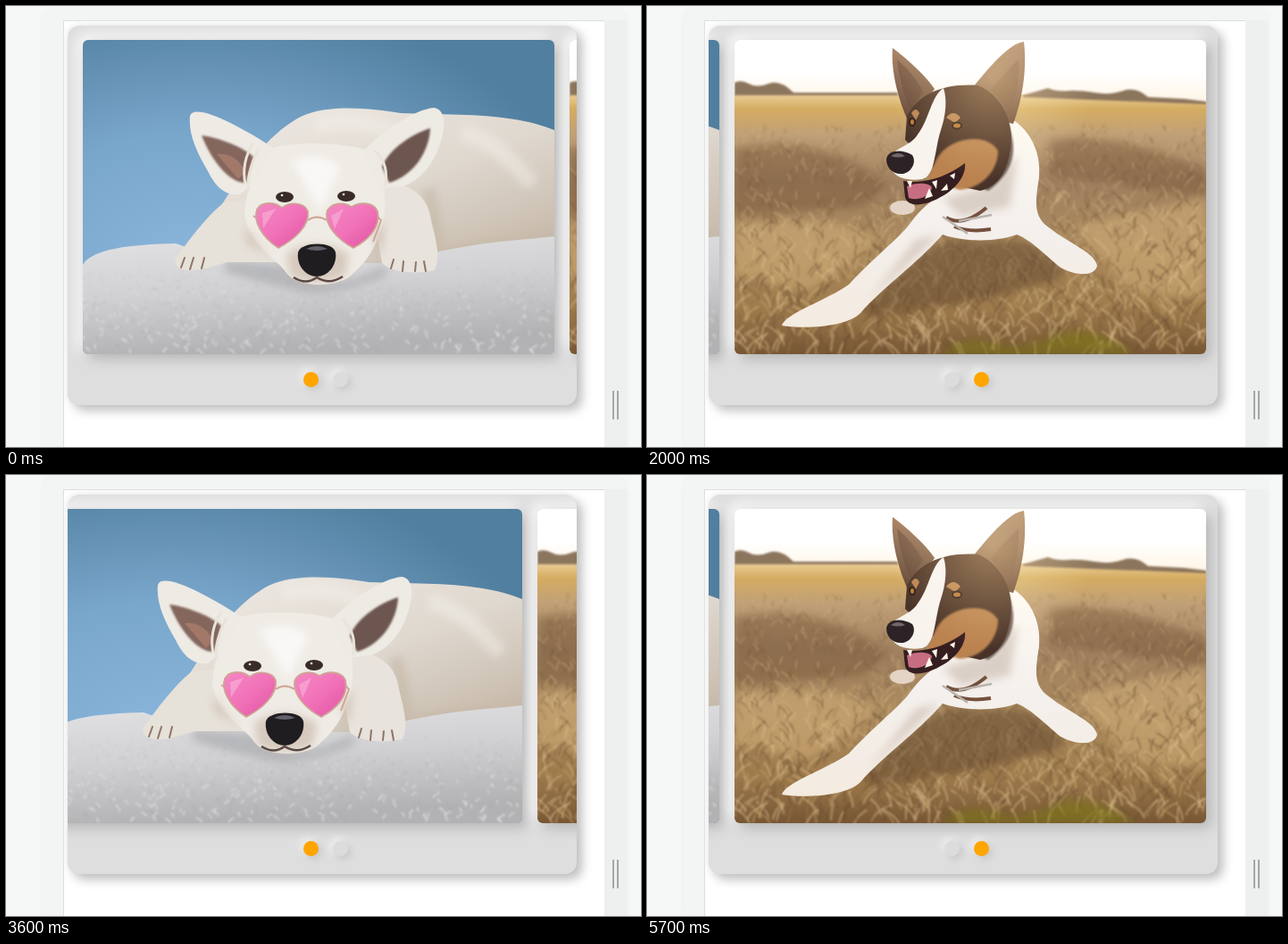
Animation of 711 by 494 pixels, one loop 5.8 s. Source, as an HTML page:

```html
<!DOCTYPE html>
<html lang="en">
<head>
<meta charset="utf-8">
<title>Photo slider</title>
<style>
  html, body { margin: 0; width: 100%; height: 100%; overflow: hidden; background: #f5f8f7; }
  div, svg { position: absolute; box-sizing: border-box; }
  #stage { inset: 0; overflow: hidden; contain: strict; }
  #shell { left: 41px; top: 0; width: 654px; height: 494px; border-radius: 18px 18px 0 0; background: #f2f5f4; box-shadow: 0 0 6px #eaeeed; }
  #gutter { left: 670px; top: 16px; width: 25px; height: 478px; background: #edf0ef; }
  #screen { left: 64px; top: 16px; width: 606px; height: 478px; background: #fff; border: solid #dcdede; border-width: 1px 0 0 1px; }
  .grip { top: 431px; width: 2px; height: 32px; background: #a5a7a7; }
  #card { left: 69px; top: 22px; width: 570px; height: 425px; border-radius: 13px; background: #dedede; box-shadow: 6px 6px 12px #bebebe, -2px -2px 6px #f4f4f4; overflow: hidden; }
  #track { left: 0; top: 16px; width: 1107px; height: 352px; }
  .photo { top: 0; width: 528px; height: 352px; border-radius: 6px; overflow: hidden; }
  .lift { top: 0; width: 528px; height: 352px; border-radius: 6px; box-shadow: 5px 5px 15px #aeaeae, -5px -5px 15px #fff, 0 0 16px #eee; }
  .dot { top: 388px; width: 17px; height: 17px; border-radius: 50%; box-shadow: 3px 3px 8px #c4c4c4, -3px -3px 8px #f2f2f2; }
  #touch { width: 21px; height: 21px; margin: -10.5px; border-radius: 50%; border: 1.5px solid #fff; background: rgba(0,0,0,.45); background-clip: padding-box; }
</style>
</head>
<body>
<div id="stage">
<div id="shell"></div>
<div id="gutter"></div>
<div id="screen"></div>
<div class="grip" style="left:679px"></div>
<div class="grip" style="left:684px"></div>

<div id="card">
  <div id="track">
    <div class="lift" style="left:17px"></div>
    <div class="lift" style="left:562px"></div>

    <svg class="photo" style="left:17px" viewBox="86 38 528 352">
      <defs>
        <radialGradient id="wall" cx=".25" cy=".72" r=".85"><stop stop-color="#8bb6dc"/><stop offset=".5" stop-color="#79a6cb"/><stop offset="1" stop-color="#517f9f"/></radialGradient>
        <linearGradient id="coat" x2=".8" y2="1"><stop stop-color="#eeeae4"/><stop offset=".55" stop-color="#dfd8cf"/><stop offset="1" stop-color="#c6b9a9"/></linearGradient>
        <linearGradient id="towel" x2=".25" y2="1"><stop stop-color="#e2e2e4"/><stop offset=".5" stop-color="#d1d1d4"/><stop offset="1" stop-color="#b2b2b4"/></linearGradient>
        <linearGradient id="lens" x2="1" y2="1"><stop stop-color="#f487c4"/><stop offset=".5" stop-color="#f172b8"/><stop offset="1" stop-color="#e052a2"/></linearGradient>
        <filter id="soft" x="-30%" y="-30%" width="160%" height="160%"><feGaussianBlur stdDeviation="5"/></filter>
        <filter id="fuzz"><feGaussianBlur stdDeviation=".8"/></filter>
      </defs>
      <path fill="url(#wall)" d="M86 38h528v352H86z"/>
      <path fill="url(#coat)" d="M236 232C262 190 290 145 330 124C362 109 410 115 442 120C505 122 570 120 614 139V266L460 294H240Z"/>
      <g filter="url(#soft)" fill="none">
        <path stroke="#c7b9a8" stroke-width="16" opacity=".65" d="M614 256C560 268 510 272 478 282M472 205C480 230 478 250 486 270"/>
        <path stroke="#f4f1ec" stroke-width="18" opacity=".45" d="M345 134C390 122 430 134 460 158M510 142C550 150 570 180 590 200"/>
      </g>
      <path fill="url(#towel)" d="M86 290C96 272 140 267 190 266L250 287L420 288L500 272C545 263 580 262 614 258V390H86Z"/>
      <g id="fluff" filter="url(#fuzz)"></g>
      <path fill="#9fa0a4" opacity=".55" filter="url(#soft)" d="M245 285L318 290Q345 320 395 304L425 290V302Q395 316 345 322Q300 314 245 298Z"/>
      <path fill="#e6e1d9" d="M244 220C220 240 206 262 190 282C186 297 205 299 223 294L248 287H310L300 215Z"/>
      <path fill="#e8e3dc" d="M405 195C440 195 470 205 475 235C479 255 488 278 480 296C458 301 430 298 421 288Z"/>
      <path fill="none" stroke="#8d7567" stroke-width="2" stroke-linecap="round" d="M196 293l4-11M206 295l4-13M219 294l3-12M431 294l3-10M444 297l1-11M458 297l1-10M470 297l-2-11"/>
      <path fill="#efebe5" d="M294 160C322 151 376 153 404 161C426 186 429 226 419 254C410 277 402 288 389 299C376 316 326 317 314 299C304 283 270 267 267 232C270 200 280 175 294 160Z"/>
      <g filter="url(#soft)" opacity=".65">
        <path fill="#c9b8a9" d="M314 278Q345 256 384 278L380 302Q346 318 318 302ZM268 246L285 270L300 283L270 266ZM410 258L425 240L420 280Z"/>
        <path fill="#fff" d="M320 175Q348 160 375 180L352 230Z"/>
      </g>
      <path fill="#eeeae4" d="M206 123C210 112 240 121 298 158C291 180 277 200 262 211C244 213 234 201 226 185C213 163 204 143 206 123Z"/>
      <path fill="#84665d" filter="url(#fuzz)" d="M219 145C235 147 263 156 277 169L269 198C250 199 230 173 219 145Z"/>
      <path fill="#b5836f" opacity=".6" d="M236 166C250 164 262 172 268 186L260 194Z"/>
      <path fill="#eeeae4" d="M400 163C423 138 458 116 479 114C493 116 492 136 487 151C478 182 460 197 444 202L418 205Z"/>
      <path fill="#6d5650" filter="url(#fuzz)" d="M421 180C430 158 458 142 475 137C474 162 457 190 429 198Z"/>
      <path fill="none" stroke="#e9e3da" stroke-width="3" d="M277 153Q263 175 268 200M413 162Q430 178 424 202M283 160Q268 190 272 207"/>
      <g fill="#392b27"><ellipse cx="312" cy="214" rx="10" ry="6"/><ellipse cx="381" cy="213" rx="10" ry="6"/></g>
      <g fill="#f4eee8"><circle cx="309" cy="212" r="1.3"/><circle cx="378" cy="211" r="1.3"/></g>
      <g fill="url(#lens)" stroke="#cfa394" stroke-width="1.8">
        <path d="M305 271C285 258 277 240 281 228C286 219 300 219 309 226C318 219 334 220 338 230C340 247 322 262 305 271Z"/>
        <path d="M389 271C372 262 358 247 359 232C362 220 378 219 387 225C397 219 412 220 416 230C420 247 406 262 389 271Z"/>
        <path fill="none" d="M338 240Q348 233 359 240M281 238l-4-3M416 236l4 4-9 24"/>
      </g>
      <path fill="#fac0df" opacity=".5" d="M287 232l15-5-14 22ZM364 235l14-8-10 23Z"/>
      <path fill="#1f1d1f" d="M327 276C330 264 366 263 369 276C371 291 360 303 348 303C336 303 325 291 327 276Z"/>
      <path fill="#62616a" d="M336 272Q348 266 360 272Q348 276 336 272Z"/>
      <path fill="none" stroke="#594843" stroke-width="2.5" d="M322 304Q336 313 348 304Q362 313 377 303"/>
    </svg>

    <svg class="photo" style="left:562px" viewBox="97 38 528 352">
      <defs>
        <linearGradient id="field" x2="0" y2="1"><stop offset=".17" stop-color="#ecd09a"/><stop offset=".22" stop-color="#d5ac62"/><stop offset=".3" stop-color="#c0a077"/><stop offset=".45" stop-color="#a08160"/><stop offset=".65" stop-color="#ab8a5e"/><stop offset=".85" stop-color="#a07c4d"/><stop offset="1" stop-color="#765634"/></linearGradient>
        <linearGradient id="sky" x2="0" y2="1"><stop offset=".5" stop-color="#fff"/><stop offset="1" stop-color="#fff5e6"/></linearGradient>
        <radialGradient id="sun"><stop stop-color="#dcae70" stop-opacity=".55"/><stop offset="1" stop-color="#e3b070" stop-opacity="0"/></radialGradient>
        <linearGradient id="ear" x2="0" y2="1"><stop stop-color="#ac8668"/><stop offset="1" stop-color="#604537"/></linearGradient>
        <linearGradient id="chest" x2="0" y2="1"><stop stop-color="#fffaf1"/><stop offset=".5" stop-color="#f4f0ed"/><stop offset="1" stop-color="#f4ebe0"/></linearGradient>
      </defs>
      <path fill="url(#field)" d="M97 38h528v352H97z"/>
      <path fill="url(#sky)" d="M97 38h528v70L430 99L97 99Z"/>
      <path fill="#8b745c" filter="url(#fuzz)" d="M97 86Q104 82 113 87T135 87T163 97L280 97V100H97ZM420 100L448 92Q458 96 470 95T500 97T532 95T560 102L600 104L625 107V110L420 102Z"/>
      <g filter="url(#soft)" opacity=".45">
        <path fill="#735438" d="M97 160Q190 140 270 200L240 225L97 235ZM450 150Q530 140 625 185V215Q540 200 450 190Z"/>
        <path fill="#dcb780" d="M97 245Q200 230 260 262L180 320L97 300ZM480 245L625 215V330L540 320Z"/>
      </g>
      <g id="grass" fill="none" stroke-linecap="round" filter="url(#fuzz)"></g>
      <path fill="#7f7918" opacity=".6" filter="url(#soft)" d="M330 390Q350 368 385 378T455 370T545 390Z"/>
      <path fill="#5b422a" opacity=".5" filter="url(#soft)" d="M240 338Q290 280 335 262L430 264L470 300Q400 330 250 348Z"/>
      <ellipse cx="285" cy="226" rx="14" ry="8" fill="#e3d4c5"/>
      <path fill="url(#chest)" d="M402 124C426 135 441 162 438 192C434 217 432 233 445 245C470 266 500 275 503 291C500 304 478 302 462 293C440 275 430 263 413 256C390 265 352 264 330 256C300 290 262 316 238 344C222 360 175 362 150 358C154 344 200 330 225 312C250 285 275 265 290 248C302 232 312 220 328 213Z"/>
      <path fill="#b9a596" opacity=".45" filter="url(#soft)" d="M330 216L385 200L415 165L405 225L350 236ZM300 262L326 256L245 332Z"/>
      <path fill="#6b5c55" filter="url(#fuzz)" d="M400 125C417 160 410 186 381 207L360 198Z"/>
      <path fill="url(#ear)" d="M274 47C291 60 311 78 321 93L300 124L290 126C280 103 272 73 274 47Z"/>
      <path fill="#5b4336" opacity=".4" d="M279 60Q298 76 308 96L294 116Q282 90 279 60Z"/>
      <path fill="url(#ear)" d="M364 91C384 66 405 42 421 40C425 74 418 108 409 132L385 126Z"/>
      <path fill="#6d4b39" opacity=".4" d="M384 94Q402 72 415 60Q417 90 405 118Z"/>
      <path fill="#493329" d="M290 124C302 99 331 86 370 89C397 101 411 132 406 160C402 187 392 202 372 207L340 200L288 150Z"/>
      <path fill="#ba8250" filter="url(#fuzz)" d="M333 160C352 145 382 145 392 162C392 186 372 205 349 206C337 202 321 198 312 197C319 181 323 168 333 160Z"/>
      <path fill="#ba8250" d="M334 125q8-10 16 0l-6 6ZM295 120q5-8 9 0l-4 8Z"/>
      <path fill="#f8f3ed" d="M331 92C317 101 316 125 302 144C294 158 270 160 270 174C272 190 285 197 307 194C322 191 321 160 328 139C334 121 335 104 331 92Z"/>
      <path fill="#2d2225" d="M267 172C268 161 285 160 296 167C302 176 293 189 283 188C274 188 267 181 267 172Z"/>
      <path fill="#72666a" d="M272 168q8-6 16 0q-8 3-16 0Z"/>
      <path fill="#351e20" d="M286 196C311 200 337 190 355 176C357 192 341 208 326 215C310 224 291 226 288 214Z"/>
      <path fill="#c66d82" d="M290 202C301 197 315 198 318 203C317 213 302 219 292 215Z"/>
      <path fill="#fff5e8" d="M290 196l6 0-2 8ZM318 197l6-2-1 10ZM310 216l5-12 4 9ZM328 207l7-8 1 7ZM338 190l6-3-1 7Z"/>
      <g fill="#b87736" stroke="#291c19" stroke-width="2"><ellipse cx="346" cy="134" rx="5" ry="3.5"/><ellipse cx="296" cy="130" rx="3" ry="4"/></g>
      <path fill="none" stroke="#74503d" stroke-width="4" d="M334 237Q353 248 379 226M343 247Q360 254 384 250"/>
      <path fill="none" stroke="#b9b3ad" stroke-width="2.5" d="M330 236l28 19M348 241l37-7"/>
      <circle cx="385" cy="80" r="115" fill="url(#sun)" style="mix-blend-mode:screen"/>
    </svg>
  </div>
  <div class="dot" style="left:264px"></div>
  <div class="dot" style="left:297px"></div>
</div>
<div id="touch"></div>
</div>

<script>
const $ = s => document.querySelector(s);
const LOOP = 5800, STEP = 100, SPAN = 537, RATE = 0.0104, FADE = 300;

// start time and direction of each scroll
const scrolls = [[1325, 1], [3179, 0], [5038, 1]];

// visible stretches of the touch cursor: [time, x, y]
const paths = [
  [[300, 354.5, 492], [400, 354.5, 492], [600, 367, 459], [800, 379, 436], [900, 380, 433], [1000, 380, 433], [1300, 378, 436], [1500, 371, 489]],
  [[2600, 367, 468], [2800, 350, 431], [2900, 345, 416], [3000, 345, 414], [3100, 345, 414], [3300, 340.5, 438], [3500, 344, 490]],
  [[4300, 363.5, 486.5], [4500, 381, 435], [4600, 388, 422], [4700, 388, 422], [5000, 380, 422]]
];

let seed = 7;
const rand = () => (seed = seed * 16807 % 2147483647) / 2147483647;
const pick = list => list[rand() * list.length | 0];

// short random strokes that grow towards the viewer
function blades(id, count, top, bottom, left, colors, size, lean) {
  let out = '';
  for (let i = 0; i < count; i++) {
    const depth = rand(), x = left + rand() * 528, y = top + depth * (bottom - top);
    const len = size * (.3 + depth), dx = (rand() - .5) * len * lean;
    out += `<path stroke="${pick(colors)}" stroke-width="${(.8 + depth).toFixed(1)}" opacity=".55" d="M${x.toFixed(1)} ${y.toFixed(1)}q${(dx * .2).toFixed(1)} ${(-len * .6).toFixed(1)} ${dx.toFixed(1)} ${(-len).toFixed(1)}"/>`;
  }
  $(id).innerHTML = out;
}
blades('#grass', 1800, 136, 396, 97, ['#dcbd8a', '#c9a56e', '#76573a', '#8d6d48', '#e3c593', '#684c30'], 14, 2.4);
blades('#fluff', 700, 294, 390, 86, ['#eeeef0', '#f4f4f5', '#b0b0b5', '#bcbcc0'], 4, 3);

function scrollAt(t) {
  let pos = 0;
  for (const [start, dir] of scrolls) {
    if (t < start) break;
    const x = (t - start) * RATE, left = (1 + x) * Math.exp(-x);
    pos = dir ? 1 - left : left;
  }
  return Math.round(pos * SPAN);
}

function paintDots(t) {
  const last = scrolls.filter(s => s[0] <= t).pop();
  const active = last ? last[1] : 0;
  const k = last ? Math.min(1, (t - last[0]) / FADE) : 1;
  const mix = (a, b) => Math.round(a + (b - a) * k);
  document.querySelectorAll('.dot').forEach((dot, i) => {
    dot.style.background = i === active ? `rgb(${mix(220, 255)},${mix(220, 165)},${mix(220, 0)})` : '#dcdcdc';
  });
}

function paintTouch(t) {
  const path = paths.find(p => t >= p[0][0] && t <= p[p.length - 1][0]);
  const { style } = $('#touch');
  style.display = path ? 'block' : 'none';
  if (!path) return;
  const i = Math.max(1, path.findIndex(p => p[0] >= t));
  const [a, b] = [path[i - 1], path[i]];
  const k = (t - a[0]) / (b[0] - a[0]);
  style.left = a[1] + (b[1] - a[1]) * k + 'px';
  style.top = a[2] + (b[2] - a[2]) * k + 'px';
}

function draw() {
  const t = Math.floor(performance.now() % LOOP / STEP) * STEP;
  $('#track').style.transform = `translateX(${-scrollAt(t)}px)`;
  paintDots(t);
  paintTouch(t);
  requestAnimationFrame(draw);
}
draw();
</script>
</body>
</html>
```
